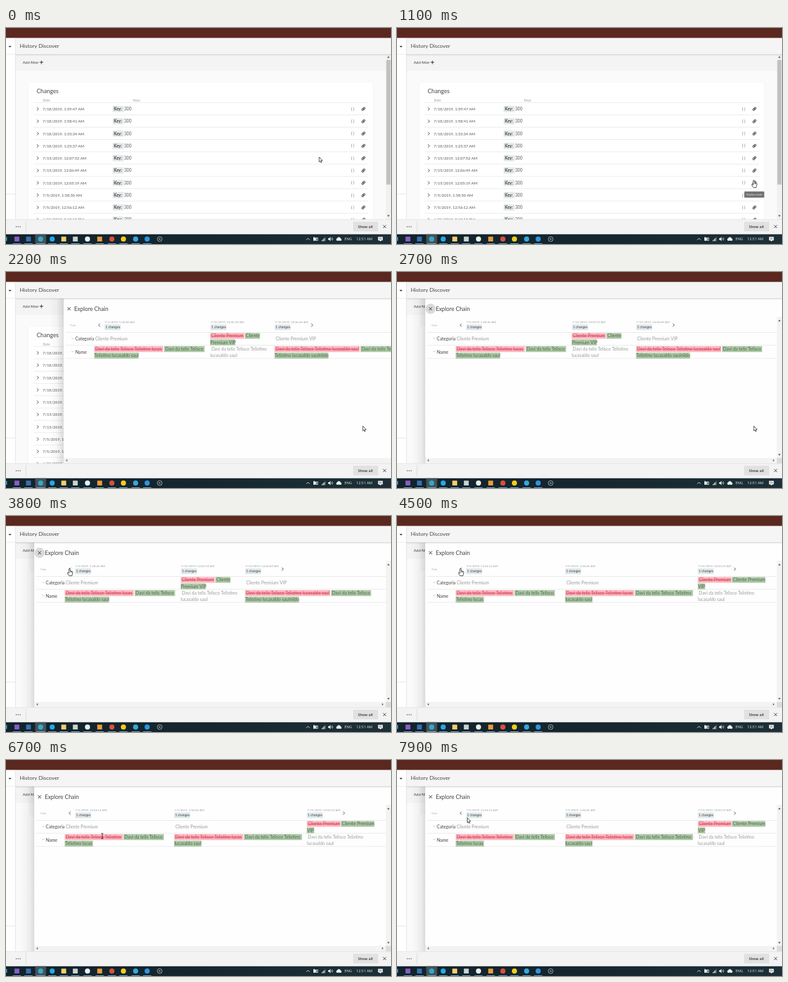
These frames come from a looping animation (600x338 px, 8000 ms). An HTML page with a canvas:

```html
<!DOCTYPE html>
<html lang="en">
<head>
<meta charset="utf-8">
<title>History Discover</title>
<style>
  html, body { margin: 0; width: 100%; height: 100%; overflow: hidden; background: #fff; }
  canvas { display: block; width: 100vw; height: 100vh; }
</style>
</head>
<body>
<canvas id="stage"></canvas>
<script>
const W = 600, H = 338, LOOP = 8000;
const canvas = document.getElementById('stage');
const ctx = canvas.getContext('2d');
const UI = 'Lato, "Open Sans", sans-serif';
const SYS = '"Open Sans", "Noto Sans", sans-serif';

// ---------- helpers ----------
const clamp = (v) => Math.max(0, Math.min(1, v));
const ramp = (t, a, b) => clamp((t - a) / (b - a));
const smooth = (p) => p * p * (3 - 2 * p);

function rect(x, y, w, h, color, r = 0) {
  ctx.fillStyle = color;
  ctx.beginPath();
  ctx.roundRect(x, y, w, h, r);
  ctx.fill();
}

function disc(x, y, r, color) {
  ctx.fillStyle = color;
  ctx.beginPath();
  ctx.arc(x, y, r, 0, Math.PI * 2);
  ctx.fill();
}

function text(str, x, y, size, color, weight = 400, family = UI) {
  ctx.font = `${weight} ${size}px ${family}`;
  ctx.fillStyle = color;
  ctx.fillText(str, x, y);
}

function trace(pts) {
  ctx.beginPath();
  for (let i = 0; i < pts.length; i += 2) ctx.lineTo(pts[i], pts[i + 1]);
}

function line(pts, color, width = 1) {
  trace(pts);
  ctx.strokeStyle = color;
  ctx.lineWidth = width;
  ctx.stroke();
}

function poly(pts, color) {
  trace(pts);
  ctx.closePath();
  ctx.fillStyle = color;
  ctx.fill();
}

// Evenly spaced colour stops from (x0, y0) to (x1, y1)
function gradient(x0, y0, x1, y1, ...colors) {
  const g = ctx.createLinearGradient(x0, y0, x1, y1);
  colors.forEach((c, i) => g.addColorStop(i / (colors.length - 1), c));
  return g;
}

const chevron = (x, y, d, color = '#444') =>
  line([x - d * 1.2, y - 2.4, x + d * 1.2, y, x - d * 1.2, y + 2.4], color, 1);

function cross(x, y, r, color, width) {
  line([x - r, y - r, x + r, y + r], color, width);
  line([x - r, y + r, x + r, y - r], color, width);
}

function arrowV(x, y, d) {
  poly([x - 2, y - d, x + 2, y - d, x, y + d * 1.2], '#606060');
}

function arrowH(x, y, d) {
  poly([x - d, y - 2, x - d, y + 2, x + d * 1.2, y], '#707070');
}

// ---------- main page ----------
const dates = [
  '7/18/2019, 1:59:47 AM', '7/18/2019, 1:58:41 AM', '7/18/2019, 1:33:34 AM',
  '7/18/2019, 1:25:37 AM', '7/15/2019, 12:07:52 AM', '7/15/2019, 12:06:49 AM',
  '7/15/2019, 12:05:19 AM', '7/5/2019, 1:58:30 AM', '7/5/2019, 12:56:12 AM',
  '6/21/2019, 5:18:15 PM'
];

function linkIcon(x, y) {
  ctx.save();
  ctx.translate(x, y);
  ctx.rotate(-Math.PI / 4);
  ctx.strokeStyle = '#333';
  ctx.lineWidth = 0.95;
  for (const dx of [-2.9, -0.3]) {
    ctx.beginPath();
    ctx.roundRect(dx, -1.3, 3.2, 2.6, 1.3);
    ctx.stroke();
  }
  ctx.restore();
}

function drawRow(date, i) {
  const y = 126.7 + i * 19.26;
  line([43, y - 10, 565, y - 10], '#e4e4e4', 0.7);
  chevron(49.5, y, 1);
  text(date, 57.2, y + 2.3, 6.05, '#555');
  rect(166, y - 5, 17.5, 10, '#e5eaeb', 1.5);
  text('Key:', 168, y + 2.3, 6.5, '#444', 700);
  text('300', 184, y + 2.3, 6.6, '#555');
  text('{ }', 538, y + 2, 5.6, '#555');
  linkIcon(557, y);
}

function drawPage() {
  rect(0, 0, W, H, '#fff');
  rect(15, 41, 577, 260, '#fafafa');
  rect(15, 42, 577, 25, '#f4f4f5');
  text('Add filter', 26, 56, 6.05, '#444');
  line([52.5, 53.7, 58, 53.7], '#333', 1);
  line([55.2, 51, 55.2, 56.5], '#333', 1);

  ctx.save();
  ctx.beginPath();
  ctx.rect(15, 42, 577, 258);
  ctx.clip();
  rect(34.5, 86, 538, 230, '#eeeeee', 2);
  rect(35, 86, 537, 230, '#fff', 2);
  text('Changes', 47.8, 101.6, 9.1, '#444');
  text('Date', 57.4, 114.6, 5.2, '#999');
  text('Keys', 198, 114.6, 5.3, '#999');
  dates.forEach(drawRow);
  ctx.restore();

  rect(592, 42, 8, 258, '#f1f1f1');
  rect(592.7, 50, 6.6, 195, '#c1c1c1');
  arrowV(596, 45.5, -1.3);
  arrowV(596, 294, 1.3);
}

function drawFrame() {
  rect(15, 15, W - 15, 26, '#f5f5f5');
  rect(15, 41, W - 15, 3, gradient(0, 41, 0, 44, 'rgba(0,0,0,.18)', 'rgba(0,0,0,.06)', 'rgba(0,0,0,0)'));
  text('History Discover', 21.5, 31.4, 8.4, '#444');
  rect(0, 15, 14.5, 285, '#fff');
  rect(0, 0, W, 15.5, '#5b2820');
  line([14.7, 15.5, 14.7, 299], '#dcdcdc', 0.8);
  line([0, 41.2, 14, 41.2], '#e2e2e2', 0.7);
  line([0, 260, 14, 260], '#dedede', 0.8);
  poly([4, 28, 8.4, 28, 6.2, 30.6], '#333');

  rect(0, 299.4, W, 24, '#f3f3f3');
  line([0, 299.7, W, 299.7], '#dcdcdc', 0.6);
  line([31, 302, 31, 320], '#d6d6d6', 0.8);
  for (const x of [16, 19, 22]) disc(x, 311, 0.75, '#333');
  rect(541, 303.3, 39, 15, '#e1e1e1', 1);
  text('Show all', 548.5, 313, 5.8, '#333', 600, SYS);
  cross(590, 310.7, 2.3, '#333', 0.9);
}

// ---------- taskbar ----------
const icons = [
  [17, '#8a5cc4', 0], [35, '#3c6fae', 0], [54, '#35a9c4', 1], [72, '#25a8e8', 1],
  [90, '#f2cf68', 0], [108, '#c9d4cf', 0], [127, '#e8eeee', 1], [146, '#ec9a3c', 0],
  [165, '#d9503f', 1], [183, '#f4cd18', 1], [202, '#38a6dc', 1], [220, '#2b95e0', 1]
];

function drawTaskbar() {
  rect(0, 322.7, W, 15.3, gradient(0, 0, W, 0, '#12232b', '#15262e', '#1d3037'));
  rect(45.5, 322.7, 17, 15.3, '#43525a');
  rect(0, 327, 1.6, 6, '#3f9bd8');
  for (const [x, color, round] of icons) {
    if (round) disc(x, 330.3, 4, color);
    else rect(x - 3.8, 326.6, 7.6, 7.4, color, 0.6);
    rect(x - 6.5, 337, 13, 1, '#76a9cc');
  }
  ctx.strokeStyle = '#b8bcc0';
  ctx.lineWidth = 0.9;
  ctx.beginPath();
  ctx.arc(239.5, 330.3, 3.7, 0, 7);
  ctx.stroke();
  disc(239.5, 330.3, 1.3, '#8c9296');

  const ink = '#eee';
  line([468, 331.6, 470.6, 329, 473.2, 331.6], ink, 0.9);
  ctx.strokeRect(480.2, 328.5, 5.6, 3.8);
  rect(479, 327.3, 2.2, 5.5, ink);
  rect(481, 329.3, 3, 2.4, ink);
  for (let i = 0; i < 4; i++) {
    rect(492 + i * 1.6, 332 - i * 1.5, 1.1, 1.5 + i * 1.5, i < 3 ? ink : '#888');
  }
  poly([502, 329, 503.6, 329, 505.7, 327, 505.7, 333.4, 503.6, 331.4, 502, 331.4], ink);
  ctx.strokeStyle = ink;
  ctx.lineWidth = 0.7;
  for (const r of [1.6, 3.2]) {
    ctx.beginPath();
    ctx.arc(506, 330.2, r, -0.9, 0.9);
    ctx.stroke();
  }
  disc(516.6, 331.1, 2, ink);
  disc(518.8, 330, 2.7, ink);
  disc(521, 331.2, 1.9, ink);
  text('ENG', 527.5, 332.3, 5.7, ink, 400, SYS);
  text('12:51 AM', 546, 332.3, 5.75, ink, 400, SYS);
  rect(579.8, 326.8, 7.4, 5.6, '#f4f4f4');
  poly([582, 332, 585, 332, 583.5, 334.3], '#f4f4f4');
  line([581.2, 328.7, 585.8, 328.7], '#555', 0.6);
  line([581.2, 330.4, 585.8, 330.4], '#555', 0.6);
}

// ---------- chain panel ----------
const short = 'Davi da telis Telisco';
const full = short + ' Telistino';
const PREMIUM = 'Cliente Premium';

// Cells: kind, x, baseline, text, box width
const views = [
  {
    next: 431,
    heads: [[108, '7/5/2019, 1:58:30 AM'], [273, '7/15/2019, 12:05:19 AM'], [373, '7/15/2019, 12:06:49 AM']],
    cells: [
      ['same', 93, 107.4, PREMIUM],
      ['del', 272.3, 102.4, PREMIUM, 53],
      ['add', 326.3, 102.4, 'Cliente', 23.5],
      ['add', 272.3, 112.6, 'Premium VIP', 39],
      ['same', 374.3, 107.4, PREMIUM + ' VIP'],
      ['del', 91.5, 123, full + ' lucas', 107.5],
      ['add', 200.5, 123, short, 63],
      ['add', 91.5, 133.2, 'Telistino lucasaldo saul', 69],
      ['same', 274, 123, full],
      ['same', 272.3, 133.2, 'lucasaldo saul'],
      ['del', 372.5, 123, full + ' lucasaldo saul', 132.5],
      ['add', 506.5, 123, short, 62.5],
      ['add', 372.5, 133.2, 'Telistino lucasaldo saulnildo', 84]
    ]
  },
  {
    next: 526.5,
    heads: [[108, '7/5/2019, 12:56:12 AM'], [262.3, '7/5/2019, 1:58:30 AM'], [469, '7/15/2019, 12:05:19 AM']],
    cells: [
      ['same', 93, 107.4, PREMIUM],
      ['same', 264, 107.4, PREMIUM],
      ['del', 468.8, 102.4, PREMIUM, 52.5],
      ['add', 522, 102.4, PREMIUM, 52],
      ['add', 468.8, 112.6, 'VIP', 11.5],
      ['del', 91.5, 123, full, 90.5],
      ['add', 183, 123, short, 63],
      ['add', 91.5, 133.2, 'Telistino lucas', 44],
      ['del', 262, 123, full + ' lucas', 107.5],
      ['add', 370.7, 123, full, 90.5],
      ['add', 262, 133.2, 'lucasaldo saul', 42.5],
      ['same', 470.3, 123, full],
      ['same', 468.8, 133.2, 'lucasaldo saul']
    ]
  }
];

const fills = { del: '#ffb6c1', add: '#adc8a6' };
const inks = { del: '#cf4658', add: '#4f6a4d', same: '#9a9a9a' };

function drawCell([kind, x, y, str, w]) {
  if (w) rect(x, y - 7, w, 9.2, fills[kind]);
  const inset = kind !== 'same' && y < 130 && y !== 112.6 ? 1.6 : 0.4;
  text(str, x + (w ? inset : 0), y, 6.95, inks[kind]);
  if (kind === 'del') line([x + 1.5, y - 2.2, x + w - 1.5, y - 2.2], inks.del, 0.8);
}

function drawPanel(t) {
  const p = ramp(t, 1860, 2595);
  if (p <= 0) return;
  const dx = 556 * Math.pow(1 - p, 4);
  const view = views[t < 3900 ? 0 : 1];

  ctx.save();
  ctx.beginPath();
  ctx.rect(15, 41.5, W - 15, 258.5);
  ctx.clip();
  ctx.translate(dx, 0);

  rect(22, 41.5, 22, 259, gradient(22, 0, 44, 0, 'rgba(0,0,0,0)', 'rgba(0,0,0,.03)', 'rgba(0,0,0,.14)'));
  rect(44, 41.5, 560, 259, '#fefefe');

  const focus = ramp(t, 2350, 2600) * (1 - ramp(t, 3800, 4000));
  if (focus > 0) disc(52.3, 57.6, 8, `rgba(0,0,0,${0.14 * focus})`);
  cross(52.3, 57.6, 2.4, '#333', 1);
  text('Explore Chain', 60.4, 60.7, 8.75, '#444');

  text('Path', 54, 84.6, 4.4, '#aaa');
  chevron(99.5, 83.2, -1, '#555');
  chevron(view.next, 83.2, 1, '#555');
  for (const [x, date] of view.heads) {
    text(date, x, 79.6, 4.6, '#999');
    rect(x - 0.3, 82, 25, 9, '#e0e9ec', 1);
    text('1 changes', x + 1.2, 88.4, 5.2, '#444');
  }
  for (const y of [94.5, 114.6, 135.2]) line([47, y, 592, y], '#e3e3e3', 0.7);
  for (const y of [104, 124.3]) line([56, y, 60, y], '#bbb', 0.7);
  text('Categoria', 62, 107.2, 6.95, '#444');
  text('Name', 62, 127.7, 6.95, '#444');
  view.cells.forEach(drawCell);

  rect(592, 70, 8, 221, '#f3f3f3');
  arrowV(596, 76, -1.2);
  arrowV(596, 286, 1.2);
  rect(44, 291, 556, 9, '#f3f3f3');
  rect(592, 291, 8, 9, '#dcdcdc');
  arrowH(48.5, 294.7, -1.1);
  arrowH(587, 294.7, 1.1);
  ctx.restore();
}

function drawTooltip(t) {
  const a = ramp(t, 980, 1060) * (1 - ramp(t, 1400, 1500));
  if (a <= 0) return;
  ctx.globalAlpha = a;
  rect(541.3, 255.8, 31, 9.7, '#737373', 1);
  text('Explore chain', 545, 262, 4.1, '#eee');
  ctx.globalAlpha = 1;
}

// ---------- pointer ----------
// Time, x, y, shape used from that time on
const path = [
  [0, 488, 202, 'arrow'], [100, 488, 202, 'arrow'], [900, 556, 230, 'hand'],
  [1100, 556, 238, 'hand'], [1500, 556, 241, 'hand'], [1950, 556, 241, 'arrow'],
  [2850, 556, 241, 'arrow'], [3700, 108, 88, 'arrow'], [3800, 99, 82, 'hand'],
  [4550, 99, 82, 'hand'], [4750, 122, 106, 'arrow'], [5000, 146, 127, 'beam'],
  [5650, 146, 127, 'beam'], [6300, 110, 125, 'beam'], [6450, 110, 125, 'beam'],
  [6700, 150, 119, 'beam'], [7100, 211, 134, 'beam'], [7350, 211, 134, 'beam'],
  [7700, 137, 107, 'arrow'], [7900, 109.5, 90.5, 'arrow'], [8000, 109.5, 90.5, 'arrow']
];

const shapes = {
  arrow() {
    trace([0, 0, 0, 7.6, 1.7, 6.1, 2.8, 8.6, 4, 8.1, 2.9, 5.6, 5.2, 5.5]);
    ctx.closePath();
  },
  hand() {
    ctx.beginPath();
    ctx.moveTo(-1, 0.8);
    ctx.quadraticCurveTo(0, -0.8, 1, 0.8);
    ctx.lineTo(1, 4.2);
    ctx.lineTo(4, 4.7);
    ctx.quadraticCurveTo(5.1, 5, 5, 6.5);
    ctx.lineTo(4.3, 9.3);
    ctx.lineTo(3.8, 11.6);
    ctx.lineTo(-0.6, 11.6);
    ctx.lineTo(-3, 8);
    ctx.quadraticCurveTo(-3.6, 6.2, -2, 6.6);
    ctx.lineTo(-1, 7.6);
    ctx.closePath();
  }
};

function drawPointer(t) {
  let i = 0;
  while (i < path.length - 2 && t >= path[i + 1][0]) i++;
  const [t0, x0, y0, shape] = path[i], [t1, x1, y1] = path[i + 1];
  const p = smooth(ramp(t, t0, t1));
  ctx.save();
  ctx.translate(x0 + (x1 - x0) * p, y0 + (y1 - y0) * p);
  if (shape === 'beam') {
    line([0, -4, 0, 4], '#222', 0.9);
    line([-1.7, -4, 1.7, -4], '#222', 0.8);
    line([-1.7, 4, 1.7, 4], '#222', 0.8);
  } else {
    shapes[shape]();
    ctx.fillStyle = '#fff';
    ctx.fill();
    ctx.strokeStyle = '#222';
    ctx.lineWidth = 0.8;
    ctx.stroke();
    if (shape === 'hand') {
      for (const x of [1, 2.4, 3.7]) line([x, 4.6, x, 6.6], '#222', 0.5);
    }
  }
  ctx.restore();
}

// ---------- loop ----------
function resize() {
  const k = window.devicePixelRatio || 1;
  canvas.width = Math.round(innerWidth * k);
  canvas.height = Math.round(innerHeight * k);
}

function draw(t) {
  ctx.setTransform(canvas.width / W, 0, 0, canvas.height / H, 0, 0);
  drawPage();
  drawPanel(t);
  drawFrame();
  drawTaskbar();
  drawTooltip(t);
  drawPointer(t);
}

const start = performance.now();
function tick() {
  draw((performance.now() - start) % LOOP);
  requestAnimationFrame(tick);
}

addEventListener('resize', resize);
resize();
tick();
</script>
</body>
</html>
```
